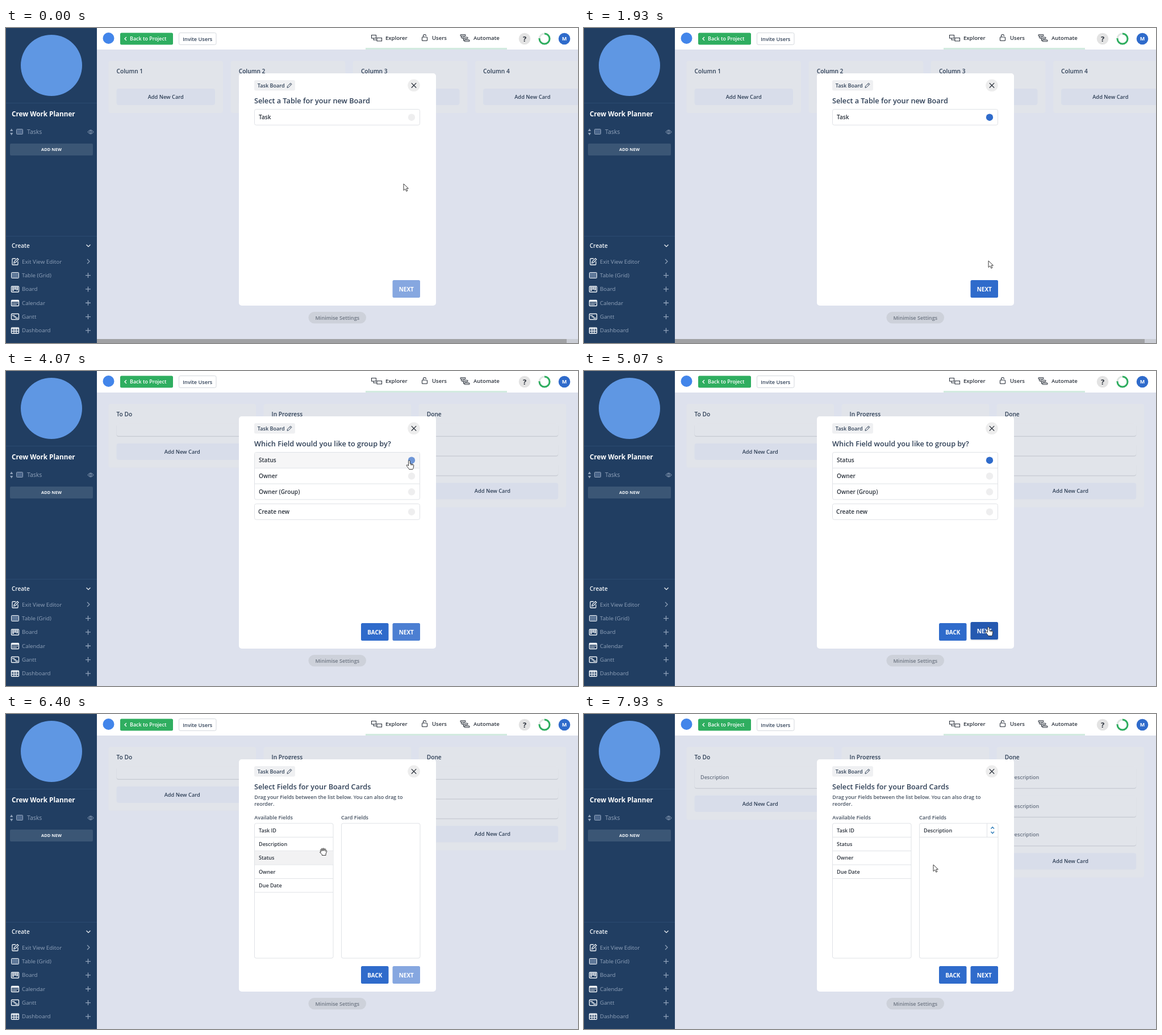
Animation of 1007x556 px, one loop 8000 ms. Source, as an HTML page:

```html
<!DOCTYPE html>
<html lang="en">
<head>
<meta charset="utf-8">
<style>
  html, body { margin: 0; width: 100%; height: 100%; overflow: hidden; background: #dde1ed; }
  svg { display: block; width: 1007px; height: 556px; font-family: "Open Sans", sans-serif; }
</style>
</head>
<body>
<svg viewBox="0 0 1007 556"><g id="board"></g><g id="chrome"></g><g id="modal"></g><g id="cursor"></g></svg>
<script>
const LOOP = 8000, STEP = 200 / 3;
const BLUE = '#2f6bcb', INK = '#2e3f56', DARK = '#2b323c', LINE = '#dfe2e6';

const rect = (x, y, w, h, fill, r = 0, more = '') =>
  `<rect x="${x}" y="${y}" width="${w}" height="${h}" rx="${r}" fill="${fill}" ${more}/>`;
const circle = (x, y, r, fill, more = '') =>
  `<circle cx="${x}" cy="${y}" r="${r}" fill="${fill}" ${more}/>`;
const path = (d, stroke, width = 1, fill = 'none', more = '') =>
  `<path d="${d}" stroke="${stroke}" stroke-width="${width}" fill="${fill}" ${more}/>`;
// y is the middle of the capitals
const text = (s, x, y, size, fill = INK, weight = 600, anchor = 'start') =>
  `<text x="${x}" y="${y + size * .36}" font-size="${size}" fill="${fill}" font-weight="${weight}" text-anchor="${anchor}">${s}</text>`;
const label = (s, x, y, size, fill, weight) => text(s, x, y, size, fill, weight, 'middle');
const group = (x, y, body, more = '') => `<g transform="translate(${x} ${y})" ${more}>${body}</g>`;
const outline = (color, w = 1) => `stroke="${color}" stroke-width="${w}"`;

const ramp = (t, a, b) => Math.min(1, Math.max(0, (t - a) / (b - a)));
const mix = (a, b, k) => a + (b - a) * k;
const blend = (from, to, k) =>
  `rgb(${from.map((v, i) => Math.round(mix(v, to[i], k)))})`;
const radio = (y, k = 0) => circle(714, y, 6.2, blend([238, 238, 239], [47, 107, 203], k));

function chrome() {
  const muted = '#91a3bb', white = '#f4f7fa';
  let s = rect(0, 0, 160, 556, '#213e62') + circle(80, 66, 54, '#5f97e3')
    + path('M0 132.5H160M0 367.5H160', '#2b4a70')
    + text('Crew Work Planner', 10, 151.5, 11.7, '#fff', 700)
    + path('M7 182L9.7 177.5 12.4 182ZM7 185L9.7 189.5 12.4 185Z', 'none', 0, muted)
    + rect(18.5, 178.5, 11, 9, '#4a658a', 1, outline(muted))
    + text('Tasks', 37, 183.5, 10.5, muted, 400)
    + path('M144 183.5Q149 176.5 154 183.5Q149 190.5 144 183.5Z', muted) + circle(149, 183.5, 1.8, 'none', outline(muted))
    + rect(7, 204, 146, 21, '#3b5675', 2) + label('ADD NEW', 80, 214.5, 7.5, white, 700)
    + text('Create', 10, 384.5, 10, white) + path('M141.5 382.5L145 386 148.5 382.5', white, 1.2)
    + path('M143 408L147 412 143 416', muted, 1.2);

  const icons = [
    path('M17 407H12Q11 407 11 408V417Q11 418 12 418H20Q21 418 21 417V412M14 415L14.6 412 20 406.6 22 408.6 16.8 414Z', white, 1.3),
    rect(9.5, 431.5, 13, 10, '#5f7898', 1, outline(white)),
    rect(9.5, 456, 13, 10, 'none', 1, outline(white, 1.4)) + path('M12.5 457V464M16 457V462M19.5 457V463', white, 2.3),
    rect(9.5, 480.5, 13, 10, 'none', 1, outline(white, 1.4)) + path('M10 482H22', white, 2.5)
      + path('M11.5 485.5H21M11.5 488H19', white, 1.4, 'none', 'stroke-dasharray="1.6 1"'),
    rect(9.5, 504.5, 13, 10, 'none', 1, outline(white, 1.4)) + path('M11 507.5H15.5M13.5 509.7H18M16.5 512H21', white, 1.6),
    rect(9.5, 529, 13, 10, 'none', 1, outline(white, 1.4)) + path('M10 531H22M10 535H22M14 529V539M18 529V539', white, 1.3),
  ];
  ['Exit View Editor', 'Table (Grid)', 'Board', 'Calendar', 'Gantt', 'Dashboard'].forEach((name, i) => {
    const y = 412.2 + i * 24.35;
    s += icons[i] + text(name, 28, y, 9.8, muted, 400);
    if (i) s += path(`M140 ${y}H149M144.5 ${y - 4.5}V${y + 4.5}`, muted, 1.3);
  });

  s += rect(160, 0, 847, 38, '#fff') + rect(633, 35, 249, 3, '#d2ebdf')
    + circle(180.5, 18, 10, '#4285ea')
    + rect(201, 8.5, 93, 21, '#2fae60', 2.5) + path('M212 16L209 19 212 22', '#fff', 1.3)
    + text('Back to Project', 218, 19, 8.95, '#fff')
    + rect(304.5, 8.5, 65.5, 21, '#fff', 2.5, outline('#d5d9de')) + label('Invite Users', 337.3, 19.5, 9.1)
    + path('M643.5 12.5H651.5V18H643.5ZM653 17.5H661.5V23H653ZM647 18V21H653', DARK, 1.1)
    + path('M733.5 16H740.5Q741.5 16 741.5 17V21.5Q741.5 22.5 740.5 22.5H733.5Q732.5 22.5 732.5 21.5V17Q732.5 16 733.5 16M734.5 16V14Q734.5 11.5 737 11.5T739.5 14', DARK, 1.1)
    + rect(800, 11.5, 9, 2.6, '#fff', 1.2, outline(DARK, 1.1)) + rect(804, 16.3, 9, 2.6, '#fff', 1.2, outline(DARK, 1.1))
    + rect(807, 21.1, 9, 2.6, '#fff', 1.2, outline(DARK, 1.1)) + path('M801.5 14V17.6H804M805.5 19V22.4H807', DARK)
    + text('Explorer', 668, 18, 9.55, DARK) + text('Users', 750, 18, 9.5, DARK) + text('Automate', 823, 18, 9.55, DARK)
    + circle(913, 19, 10.3, '#e3e3e3') + label('?', 913, 19, 13, DARK, 700)
    + circle(948, 19, 9, 'none', outline('#dfe6e2', 3))
    + circle(948, 19, 9, 'none', outline('#2fae60', 3) + ' stroke-dasharray="43 57" transform="rotate(-90 948 19)"')
    + circle(983, 19, 10.3, '#2f6bcb') + label('M', 983, 19, 9, '#fff', 700);
  return s;
}

function column(name, x, width, cards, cardHeight) {
  const pitch = cardHeight + 12.6, addY = cards < 0 ? 107 : 93 + cards * pitch;
  let s = rect(x, 58, width, addY - 58 + 43, '#e1e4ea', 4) + text(name, x + 14, 76.5, 10.2);
  for (let i = 0; i < cards; i++) {
    const y = 92.5 + i * pitch, w = width - 28;
    s += rect(x + 14, y + 1.3, w, cardHeight, '#c6cad2', 4) + rect(x + 14, y, w, cardHeight, '#e1e4ea', 4);
    if (cardHeight > 30) s += text('Description', x + 24.5, y + 19, 9.05, '#667080');
  }
  return s + rect(x + 14, addY, width - 28, 29, '#d8ddea', 4) + label('Add New Card', x + width / 2, addY + 14.7, 9.25);
}

function board(t) {
  if (t < 3999) {
    return [1, 2, 3, 4].map(n => column('Column ' + n, 180.5 + (n - 1) * 215.2, 201.5, -1, 0)).join('')
      + rect(160, 549, 847, 7, '#c9ccd4') + rect(160, 549, 827, 7, '#a0a1a4');
  }
  const height = t < 7599 ? 22.2 : 38.2;
  return ['To Do', 'In Progress', 'Done'].map((name, i) =>
    column(name, 180.5 + i * 273.1, 259.5, [1, 2, 3][i], height)).join('');
}

// start, end, destination
const moves = [
  [267, 1000, 700, 156], [1533, 2267, 714, 452], [2933, 3667, 710, 158], [4203, 5067, 712, 452],
  [5667, 6533, 557, 240.5], [7003, 7570, 655, 239], [7600, 7867, 627, 254], [7867, 7933, 615, 266],
];
function pointer(t) {
  let x = 700, y = 275;
  for (const [a, b, tx, ty] of moves) {
    const k = 1 - (1 - ramp(t, a, b)) ** 2.5;
    x = mix(x, tx, k);
    y = mix(y, ty, k);
  }
  return { x, y };
}
const inside = (p, x, y, w, h) => p.x >= x && p.x <= x + w && p.y >= y && p.y <= y + h;

function choices(names, y, p, selected) {
  let s = rect(437.5, y, 291, names.length * 27.8, '#fff', 3, outline(LINE));
  names.forEach((name, i) => {
    const top = y + i * 27.8;
    if (inside(p, 437, top, 292, 27.8)) s += rect(438, top + .5, 290, 26.8, '#f6f6f7', 2);
    if (i) s += path(`M438 ${top}H728`, LINE);
    s += text(name, name === 'Create new' ? 444 : 445, top + 14.2, 10.15, DARK) + radio(top + 14.2, i ? 0 : selected);
  });
  return s;
}

function fieldPicker(t, p) {
  const ROW = 24.35, TOP = 193, dropped = t >= 7599, dragging = t >= 6733 && !dropped;
  const over = dragging && p.x > 600;
  const names = ['Task ID', 'Description', 'Status', 'Owner', 'Due Date'].filter(n => !dropped || n !== 'Description');
  let s = text('Select Fields for your Board Cards', 437, 128.3, 12.7)
    + text('Drag your Fields between the list below. You can also drag to', 437.3, 146.5, 8.98, '#465262')
    + text('reorder.', 437.3, 158.7, 8.98, '#465262')
    + text('Available Fields', 437.3, 182.5, 9.1, '#465262') + text('Card Fields', 590, 182.5, 9.1, '#465262')
    + rect(437.5, TOP, 138.5, 238, '#fff', 3, outline(LINE))
    + rect(590.5, TOP, 138.5, 238, over ? '#f0f7ff' : '#fff', 3, outline(over ? BLUE : LINE));
  names.forEach((name, i) => {
    const y = TOP + i * ROW;
    if (!dragging && inside(p, 437, y, 139, ROW)) s += rect(438, y + .5, 137.5, ROW - 1, '#f2f2f3');
    s += path(`M438 ${y + ROW}H576`, LINE)
      + text(name, 445, y + 12.4, 9.05, dragging && name === 'Description' ? '#b9bdc3' : DARK);
  });
  if (t < 6733) return s;

  const lift = ramp(t, 6667, 6933), settle = ramp(t, 7533, 7733);
  const x = dropped ? mix(535.5, 590.5, settle) : 437.5 + p.x - 557;
  const y = dropped ? mix(229.5, TOP, settle) : TOP + ROW + 12 * lift;
  if (settle < 1) {
    s += rect(x - 1, y - 1, 140.5, ROW + 2, '#fff', 4, outline('#c3d5f4', 3 * lift));
  } else {
    s += path(`M591 ${TOP + ROW}H729M709.5 ${TOP}V${TOP + ROW}`, LINE)
      + path('M716.5 202.5L719.2 199.5 722 202.5M716.5 207.8L719.2 210.8 722 207.8', '#2a7ab8', 1.4);
  }
  return s + text('Description', x + 7.5, y + 12.4, 9.05, DARK);
}

function modal(t, p) {
  const enabled = ramp(t, 1200, 1400) - ramp(t, 2533, 2733) + ramp(t, 3933, 4133)
    - ramp(t, 5267, 5533) + ramp(t, 7533, 7733);
  const hover = enabled === 1 && inside(p, 681, 445, 48, 31);
  let s = rect(532.5, 501, 101.5, 20.5, '#cdd1da', 10.2) + label('Minimise Settings', 583.3, 511.3, 9.1, '#6d7582')
    + rect(410, 80, 347, 410, '#fff', 5)
    + rect(437, 92, 72, 18.5, '#eff0f2', 3) + text('Task Board', 442.8, 101.7, 9.08)
    + path('M495 105.3L495.6 102.6 501 97.2 503 99.2 497.6 104.6ZM499.6 98.6L501.6 100.6', INK)
    + circle(718, 101.3, 10.8, '#ededed') + path('M713.8 97.1L722.2 105.5M722.2 97.1L713.8 105.5', DARK, 1.3);
  if (t < 2599) {
    s += text('Select a Table for your new Board', 437, 128.3, 12.7)
      + choices(['Task'], 143.5, p, ramp(t, 1200, 1400));
  } else if (t < 5332) {
    s += text('Which Field would you like to group by?', 437, 128.3, 12.7)
      + choices(['Status', 'Owner', 'Owner (Group)'], 143.5, p, ramp(t, 3933, 4133))
      + choices(['Create new'], 234.5, p, 0);
  } else {
    s += fieldPicker(t, p);
  }
  s += group(0, 0, rect(625, 445, 48.5, 31, BLUE, 2.5) + label('BACK', 649.3, 461, 9.95, '#fff', 700),
    `opacity="${ramp(t, 2533, 2733)}"`);
  const fill = hover ? '#2559b0' : blend([134, 167, 224], [47, 107, 203], enabled);
  const next = rect(680.5, 445, 48.5, 31, fill, 2.5) + label('NEXT', 704.8, 461, 9.95, '#fff', 700);
  return { hover, markup: s + group(0, hover ? -2 : 0, (hover ? rect(680, 447, 49.5, 31, '#e1e5ec', 3) : '') + next) };
}

const shapes = {
  arrow: path('M0 0V11.6L2.8 9 4.8 13.2 6.8 12.3 4.9 8.2H8.4Z', '#222', .9, '#fff'),
  point: path('M-1.5 8V1.2a1.4 1.4 0 0 1 2.8 0V5.6l4.8 1.2q1.9.5 1.7 2.3l-.6 3.5q-.3 2-1.2 3H-.2q-1-2-3-4.2t-1.7-3.2q1-1.4 3.4 1zM3 6.2V8.5M5.2 6.8V8.8', '#222', .9, '#fff'),
  open: path('M-4 1.5L-5 -2.6q.9-1.5 2 0l.7 2-.7-4q1-1.6 2 0l.8 3.5V-5q1-1.3 2 0V-1l1-3q1.3-1 1.9.5L4 0l1-1.2q1.5-.3 1.3 1.2L4.6 4.5V7H-2V5.5L-6 1.8q.3-1.6 2-.3z', '#222', .9, '#fff'),
  closed: path('M-4.5 0V-3q.8-1.8 2.3-.8 1-1.4 2.2-.2 1.3-1 2.3.4 1.8-.4 2.2 1V1L3 3.5V5H-2V3.5L-5 1.5Z', '#222', .9, '#fff'),
};

function cursor(t, p, overNext) {
  const overRow = t < 2599 ? inside(p, 437, 143, 292, 28)
    : t < 5332 && (inside(p, 437, 143, 292, 84) || inside(p, 437, 234, 292, 28));
  const overField = t >= 5332 && inside(p, 437, 193, 139, 122);
  const kind = t >= 6733 && t < 7599 ? 'closed' : overNext || overRow ? 'point' : overField ? 'open' : 'arrow';
  return group(p.x, p.y, shapes[kind]);
}

const layer = id => document.getElementById(id);
layer('chrome').innerHTML = chrome();
const began = performance.now();
let shown = -1;
function tick() {
  const index = Math.floor(((performance.now() - began) % LOOP + 4) / STEP) % (LOOP / STEP);
  if (index !== shown) {
    shown = index;
    const t = index * STEP + .5, p = pointer(t), dialog = modal(t, p);
    layer('board').innerHTML = board(t);
    layer('modal').innerHTML = dialog.markup;
    layer('cursor').innerHTML = cursor(t, p, dialog.hover);
  }
  requestAnimationFrame(tick);
}
tick();
</script>
</body>
</html>
```
